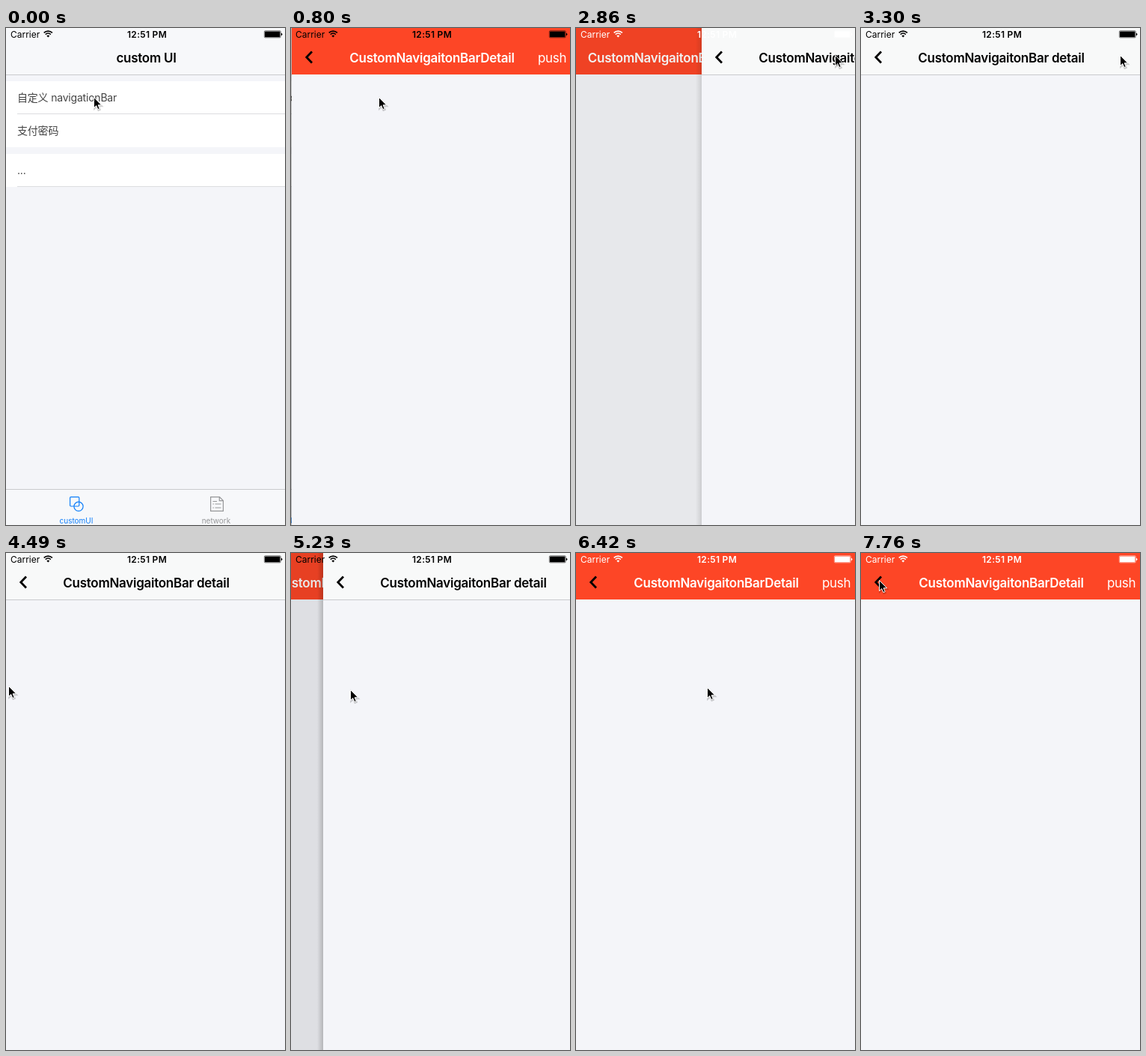
Recreate the animation shown at these times as an HTML page. Size 373x663 px, loop 8000 ms.

```html
<!DOCTYPE html>
<html lang="en">
<head>
<meta charset="utf-8">
<title>Navigation bar demo</title>
<style>
  html, body { margin: 0; width: 100%; height: 100%; overflow: hidden; background: #f4f5f9; }
  svg { display: block; width: 373px; height: 663px; }
  text { font-family: Inter, "Noto Sans CJK SC", "Noto Sans CJK", sans-serif; }
  .title { font-size: 17px; font-weight: 600; letter-spacing: -.27px; text-anchor: middle; }
  .action { font-size: 17px; letter-spacing: -.33px; fill: #fff; }
  .row { font-size: 14px; letter-spacing: -.2px; fill: #444; }
  .tab { font-size: 10px; text-anchor: middle; }
  .small { font-size: 12px; }
  .clock { font-weight: 600; letter-spacing: .3px; text-anchor: middle; }
  .chevron { fill: none; stroke: #000; stroke-width: 2.8; }
  .icon { fill: none; stroke-width: 1.2; }
</style>
</head>
<body>
<svg viewBox="0 0 373 663" xmlns="http://www.w3.org/2000/svg">
  <defs>
    <linearGradient id="edge">
      <stop offset="0" stop-color="#000" stop-opacity="0"/>
      <stop offset="1" stop-color="#000" stop-opacity=".21"/>
    </linearGradient>
    <path id="arrow" d="M.5 .5V14.6L3.7 11.6L5.9 16.6L8.2 15.6L6.1 10.8H10.6Z"/>
  </defs>

  <g id="list">
    <rect width="373" height="663" fill="#f4f5f9"/>
    <rect width="373" height="62" fill="#f7f8fa"/>
    <rect y="62" width="373" height="1" fill="#c9cacd"/>
    <text class="title" x="187.5" y="46">custom UI</text>
    <path d="M0 71H373V159H0ZM0 168H373V212H0Z" fill="#fff"/>
    <path d="M15 114.5H373M15 211.5H373" stroke="#dcdde0"/>
    <text class="row" x="15" y="98">自定义 navigationBar</text>
    <text class="row" x="15" y="142">支付密码</text>
    <text class="row" x="15" y="195">...</text>
    <rect y="615" width="373" height="48" fill="#f7f8fa"/>
    <rect y="615" width="373" height="1" fill="#c9cacd"/>
    <g class="icon" stroke="#0f7ef9">
      <rect x="85.6" y="625.6" width="12.2" height="12.4" rx="1.2"/>
      <circle cx="97" cy="638.3" r="6.1"/>
    </g>
    <g class="icon" stroke="#969799">
      <path d="M273.6 625.6H285.5L290.4 630.5V644.4H273.6Z"/>
      <path d="M285.3 625.8V630.7H290.2M276.5 631.5H282M276.5 635H278M279.5 635H287.5M276.5 640H278M279.5 640H287.5"/>
    </g>
    <text class="tab" x="94" y="661" fill="#0f7ef9">customUI</text>
    <text class="tab" x="281" y="661" fill="#969799">network</text>
  </g>

  <g id="detail">
    <rect class="side" x="-8" width="8" height="663" fill="url(#edge)"/>
    <rect width="373" height="663" fill="#f4f5f9"/>
    <rect width="373" height="62" fill="#fd4626"/>
    <path class="chevron" d="M27 31.5L19.8 39L27 46.5"/>
    <text class="title" x="187.5" y="46" fill="#fff">CustomNavigaitonBarDetail</text>
    <text class="action" x="329" y="46">push</text>
  </g>

  <g id="next">
    <rect class="side" x="-8" width="8" height="663" fill="url(#edge)"/>
    <rect width="373" height="663" fill="#f4f5f9"/>
    <rect width="373" height="62" fill="#f8f9f9"/>
    <rect y="62" width="373" height="1" fill="#c9cacd"/>
    <path class="chevron" d="M27 31.5L19.8 39L27 46.5"/>
    <text class="title" x="187.5" y="46">CustomNavigaitonBar detail</text>
  </g>

  <g id="status">
    <text class="small" x="6" y="12.5">Carrier</text>
    <path d="M50.7 6.4A8 8 0 0 1 61.9 6.4M52.8 8.6A5 5 0 0 1 59.8 8.6" fill="none" stroke="currentColor" stroke-width="1.6"/>
    <path d="M56.3 12.4L54.4 10.4A2.7 2.7 0 0 1 58.2 10.4Z"/>
    <text class="small clock" x="188.5" y="12.5">12:51 PM</text>
    <rect x="345.3" y="3.7" width="22" height="9.2" rx="1.3" fill="none" stroke="currentColor" stroke-width=".7" opacity=".7"/>
    <rect x="346" y="4.4" width="20.4" height="7.8" rx=".6"/>
    <path d="M367.8 6.6Q369.4 7.2 369.4 8.4T367.8 10.2Z"/>
  </g>

  <g id="cursor">
    <use href="#arrow" x=".6" y="1.4" fill="#000" stroke="#000" stroke-width="2" opacity=".18"/>
    <use href="#arrow" fill="#000" stroke="#fff" stroke-width="1"/>
  </g>
</svg>
<script>
const W = 373, LOOP = 8000;
const TICK = 148, FIRST = 500, LEAD = 15;   // screen refresh cadence, ms
const GRAB = 29, RELEASE = 36;              // ticks of the edge swipe
const $ = id => document.getElementById(id);
const list = $('list'), detail = $('detail'), next = $('next');
const status = $('status'), cursor = $('cursor');

// Pointer stops: tick, x, y
const stops = [
  [-4, 117, 92], [5, 117, 92], [13, 342, 36], [14, 346, 36], [19, 346, 36],
  [23, 3, 173], [25, 3, 174], [27, 3, 177], [28, 3, 177], [32, 79, 182],
  [35, 238, 184], [36, 286, 185], [37, 286, 185], [44, 5, 170],
  [45, 7, 160], [49, 24, 36], [51, 24, 36]
];
const soft = new Set([5, 19, 37]);   // moves that ease in and out

function pointer(k) {
  let i = 0;
  while (i < stops.length - 2 && stops[i + 1][0] <= k) i++;
  const [k0, x0, y0] = stops[i], [k1, x1, y1] = stops[i + 1];
  let u = (k - k0) / (k1 - k0);
  if (soft.has(k0)) u = u * u * (3 - 2 * u);
  return [x0 + (x1 - x0) * u, y0 + (y1 - y0) * u];
}

// Left edge of a pushed page, critically damped
function push(t, start) {
  const a = Math.max(0, t - start) * .02;
  return Math.round(W * (1 + a) * Math.exp(-a));
}

// The page trails the pointer during the swipe
const drag = x => Math.max(0, Math.round((x - 33.5) * .946));

function place(page, x) {
  page.setAttribute('transform', `translate(${x} 0)`);
  page.style.display = x < W ? '' : 'none';
}

// Slides the lower page back and dims it as the upper one covers it
function cover(lower, upper, x, base) {
  const p = 1 - x / W;
  place(upper, x);
  upper.querySelector('.side').style.opacity = x ? p : 0;
  place(lower, base - .3 * W * p);
  lower.style.filter = p ? `brightness(${1 - .1 * p})` : 'none';
}

function draw(ms) {
  const k = Math.floor((ms - FIRST + LEAD) / TICK);
  const t = FIRST + k * TICK;
  const [cx, cy] = pointer(k);
  const x1 = push(t, 390);
  let x2 = push(t, 2776);
  if (k >= GRAB) x2 = k < RELEASE ? drag(cx) : W;

  cover(list, detail, x1, 0);
  if (x2 < W) cover(detail, next, x2, x1);
  else place(next, W), detail.style.filter = 'none';

  const light = x1 === 0 && (k < GRAB ? x2 > 0 : k > RELEASE);
  status.style.color = status.style.fill = light ? '#fff' : '#000';
  cursor.setAttribute('transform', `translate(${Math.round(cx)} ${Math.round(cy)})`);
}

const begin = performance.now();
function loop() {
  draw((performance.now() - begin) % LOOP);
  requestAnimationFrame(loop);
}
draw(0);
requestAnimationFrame(loop);
</script>
</body>
</html>
```
